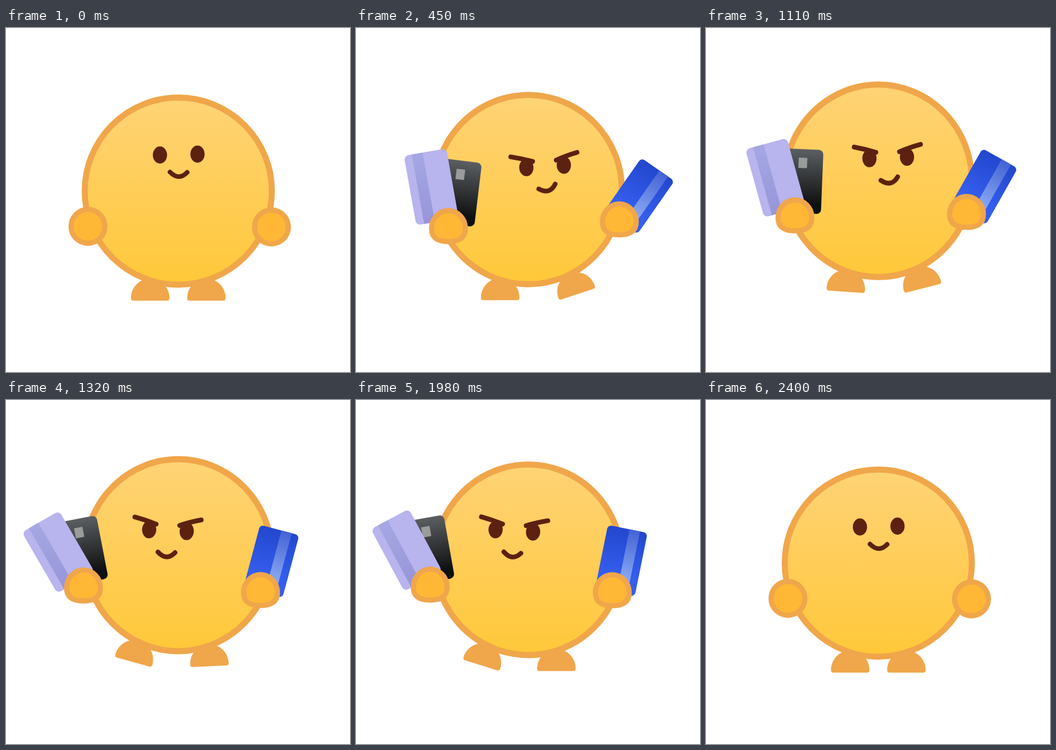
These frames come from a looping animation (600x600 px, 2.7 s). An HTML page:

```html
<!DOCTYPE html>
<html lang="en">
<head>
<meta charset="utf-8">
<title>Card juggler</title>
<style>
  html, body { margin: 0; width: 100%; height: 100%; overflow: hidden; background: #fff; }
  svg { display: block; width: 100vw; height: 100vh; }
  .skin { stroke: #f0a64a; }
  .ink { fill: none; stroke: #5c2110; stroke-width: 8; stroke-linecap: round; stroke-linejoin: round; }
</style>
</head>
<body>
<svg viewBox="0 0 600 600">
  <defs>
    <linearGradient id="gBody" x2="0" y2="1"><stop stop-color="#ffd376"/><stop offset="1" stop-color="#ffc839"/></linearGradient>
    <linearGradient id="gDark" x2="0" y2="1"><stop stop-color="#5b5f62"/><stop offset=".85" stop-color="#0f1011"/></linearGradient>
    <linearGradient id="gBlue" x2="0" y2="1"><stop stop-color="#2347cd"/><stop offset=".75" stop-color="#345eee"/></linearGradient>
    <linearGradient id="gShine" x2="0" y2="1"><stop stop-color="#4363d5"/><stop offset=".75" stop-color="#86a5f2"/></linearGradient>
    <linearGradient id="gBand" x2="0" y2="1"><stop stop-color="#a5a7e3"/><stop offset="1" stop-color="#9795d8"/></linearGradient>
    <path id="foot" fill="#f0a64a" d="M222 475.5H281Q285 475.5 285 471C285 452 270 437 251.5 437S218 452 218 471Q218 475.5 222 475.5Z"/>
  </defs>

  <g id="footL"><use href="#foot"/></g>
  <g id="footR"><use href="#foot" x="98"/></g>

  <g id="body">
    <circle class="skin" cx="300.5" cy="284.5" r="163.2" fill="url(#gBody)" stroke-width="10.5"/>
    <g id="face">
      <g fill="#5c2110">
        <ellipse cx="268.5" cy="221.5" rx="12.4" ry="15"/>
        <ellipse cx="334" cy="220" rx="12.4" ry="15"/>
      </g>
      <path id="mouth" class="ink" d="M286 251.3Q301.5 267 316 251.8"/>
      <g id="brows" class="ink">
        <path id="browL" d="M242 202Q262 206 280 211.5"/>
        <path id="browR" d="M321 211Q338 204 358 199"/>
      </g>
    </g>
  </g>

  <g id="handL">
    <g id="dark">
      <rect x="-24" y="-116" width="69" height="112" rx="8" fill="url(#gDark)"/>
      <rect x="2.5" y="-101" width="15" height="18" rx="1" fill="#9a9b9b"/>
    </g>
    <g id="lilac">
      <rect x="-55" y="-134" width="75" height="123" rx="8" fill="#b7b4ee"/>
      <rect x="-41" y="-134" width="19" height="123" fill="url(#gBand)"/>
    </g>
    <path class="skin fist" fill="#ffb735" stroke-width="9"/>
  </g>
  <g id="handR">
    <g id="blue">
      <rect x="-30" y="-110" width="70.5" height="113" rx="7" fill="url(#gBlue)"/>
      <rect x="8.5" y="-110" width="18.5" height="113" fill="url(#gShine)"/>
    </g>
    <path class="skin fist" fill="#ffb735" stroke-width="9"/>
  </g>
</svg>
<script>
const LOOP = 2700, STEP = 30, REST = 2400, JUMP = 480;

// Each part: x, y, rotation
const rest = {
  face: [0, 0, 0], mouth: [0, 0, 0], footL: [0, 0, 0], footR: [0, 0, 0],
  handL: [143, 346, 0], handR: [463, 347, 0],
  lilac: [0, 0, 12], dark: [-19, 0, -4], blue: [0, 0, 0], armed: [0]
};
const right = {
  ...rest, face: [29, 25.5, -2.4], mouth: [3, 4, -15], footR: [38.5, 0, -18.5],
  handL: [163, 348.5, 0], handR: [458, 336.5, 0],
  lilac: [0, 0, -10.3], dark: [0, 0, 7], blue: [0, 0, 36], armed: [1]
};
const left = {
  ...rest, face: [-27, 21, 5], mouth: [0, 7, -1], footL: [-36, 0, 18],
  handL: [131, 335, 0], handR: [441.5, 346, 0],
  lilac: [10, 0, -33.5], dark: [0, 0, -14], blue: [0, 0, 12.5], armed: [1]
};

// arc: extra offset at the top of the jump
const jumps = [
  { at: 0, from: rest, to: right,
    arc: { face: [-4, -43, 0], handL: [-42, -80, 0], handR: [33, -72, 0], blue: [0, 0, -20] } },
  { at: 960, from: right, to: left,
    arc: { handL: [-1, -27, 0], handR: [0, -26, 0], blue: [0, 0, -2] } },
  { at: 1920, from: left, to: rest,
    arc: { face: [6, -43, 0], handL: [-14, -92, 0], handR: [32, -98, 0],
           lilac: [0, 0, 24], dark: [0, 0, 24], blue: [0, 0, -4] } }
];

const $ = id => document.getElementById(id);
const move = (id, value) => $(id).setAttribute('transform', value);
const clamp = v => Math.min(1, Math.max(0, v));
const fists = document.querySelectorAll('.fist');

function poseAt(t) {
  const { at, from, to, arc } = jumps.findLast(j => j.at <= t);
  const u = clamp((t - at) / JUMP);
  const ease = Math.sin(u * Math.PI / 2) ** 2;
  const air = Math.sin(u * Math.PI) ** 2;
  const pose = { air };
  for (const part in from) {
    pose[part] = from[part].map((v, i) =>
      v + (to[part][i] - v) * ease + (arc[part]?.[i] ?? 0) * air);
  }
  return pose;
}

// Open hand at k = 0, flatter closed hand at k = 1
function fist(k) {
  const mid = 4 * k, cap = 29.5 - 2.5 * k, rise = -16.3 + 3.3 * k, low = 16.3 + 4.7 * k;
  return `M-29.5 ${mid}C-29.5 ${rise} -16.3 ${-cap} 0 ${-cap}S29.5 ${rise} 29.5 ${mid}`
    + `C29.5 ${low} ${16.3 + 1.7 * k} ${cap} 0 ${cap}S-29.5 ${low} -29.5 ${mid}Z`;
}

function draw(t) {
  const pose = poseAt(t), [armed] = pose.armed;
  const up = 19 * pose.air;
  const stretch = 1 + .037 * pose.air ** .25 - .005 * armed;
  const shown = clamp((armed - .1) / .35);
  const calm = 1 - armed;

  const place = (id, pivot, dy = 0) => {
    const [x, y, r] = pose[id];
    move(id, `translate(${x} ${y + dy}) rotate(${r} ${pivot})`);
  };
  place('footL', '285 475', -up);
  place('footR', '316 475', -up);
  place('face', '301 221');
  place('mouth', '301 255');
  place('handL', '0 0');
  place('handR', '0 0');

  move('body', `translate(0 ${453 - up}) scale(1 ${stretch}) translate(0 -453)`);
  move('brows', `translate(0 ${-14 * calm})`);
  move('browL', `rotate(${-16 * calm} 280 211)`);
  move('browR', `rotate(${16 * calm} 321 211)`);
  $('brows').style.opacity = shown;

  for (const id of ['lilac', 'dark', 'blue']) {
    const [x, y, r] = pose[id];
    move(id, `rotate(${r}) translate(${x} ${y}) scale(${shown})`);
  }
  fists.forEach(f => f.setAttribute('d', fist(shown)));
}

const start = performance.now();
function tick() {
  const t = (performance.now() - start) % LOOP;
  draw(Math.min(REST, Math.floor(t / STEP) * STEP));
  requestAnimationFrame(tick);
}
tick();
</script>
</body>
</html>
```
